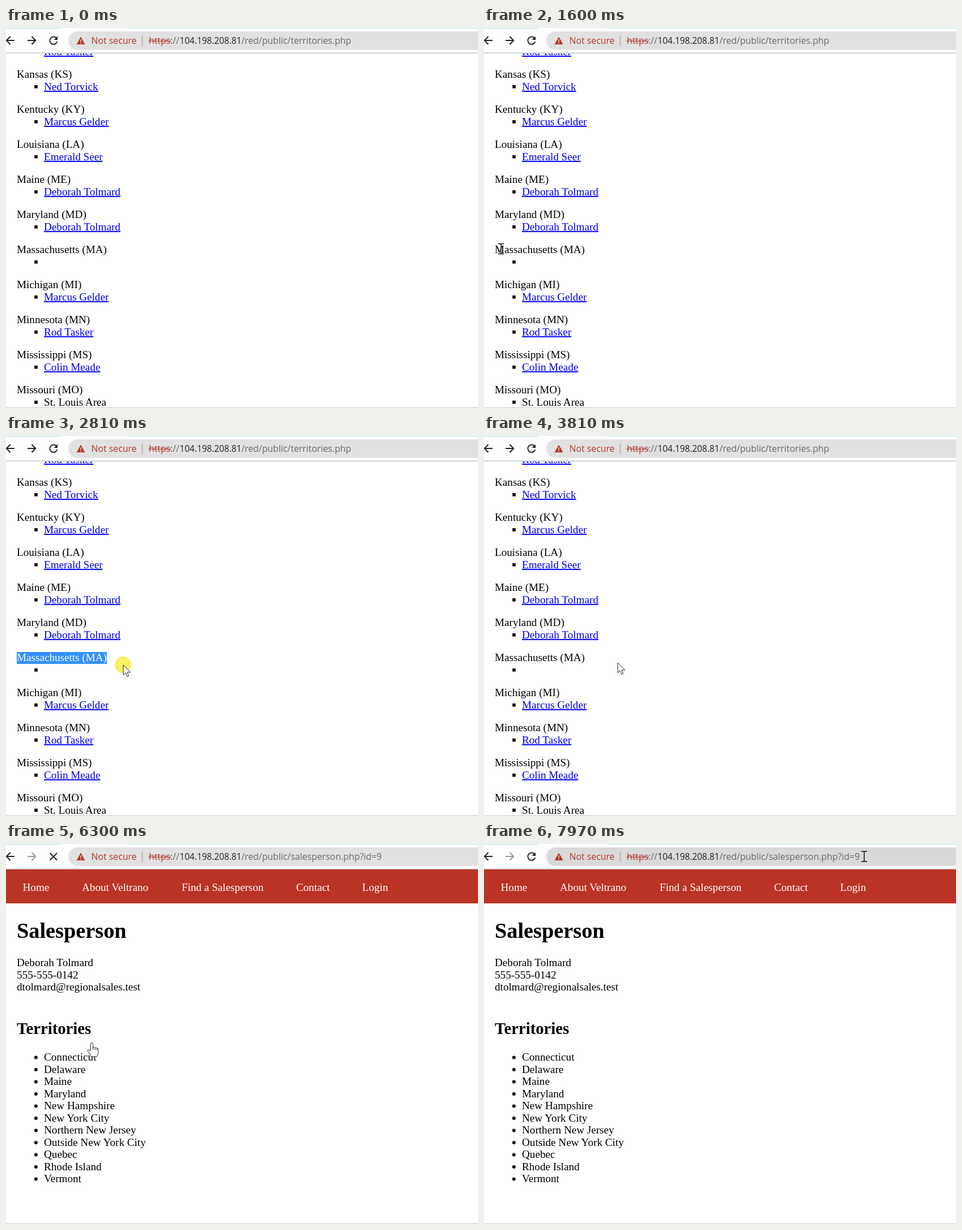
Write an HTML page that moves like this. It is 833x672 px and loops after 8 s.

```html
<!DOCTYPE html>
<html lang="en">
<head>
<meta charset="utf-8">
<title>Territories</title>
<style>
  html, body { margin: 0; width: 100%; height: 100%; overflow: hidden; background: #fff; }
  svg { display: block; width: 833px; height: 672px; }
  text { font: 19.15px "Liberation Serif", "Times New Roman", serif; }
  .link { fill: #00e; text-decoration: underline; }
  .nav { fill: #fff; }
  .h1 { font-size: 38.3px; font-weight: bold; }
  .h2 { font-size: 28.7px; font-weight: bold; }
  .bar text { font: 15.85px "Open Sans", "Noto Sans", sans-serif; fill: #66686b; }
  .bar .warn { fill: #b3362b; }
  .bar .host { font-size: 15.4px; fill: #202124; }
  .icon { fill: none; stroke: #202124; stroke-width: 2; }
  .pointer { fill: #fff; stroke: #222; stroke-width: 1; stroke-linejoin: round; }
</style>
</head>
<body>
<svg viewBox="0 0 833 672">
  <defs><clipPath id="clip"><rect id="clipBox" x="19" y="382" height="21.3"/></clipPath></defs>

  <g id="list"></g>
  <g id="selection">
    <rect x="19" y="382" width="160" height="21.3" fill="#3390fa" clip-path="url(#clip)"/>
    <text id="label" x="19" y="398" fill="#fff" clip-path="url(#clip)">Massachusetts (MA)</text>
  </g>
  <g id="person"></g>

  <g class="bar">
    <path d="M0 0H833V45H0Z" fill="#fff"/>
    <path d="M0 .5H95M217 .5H833" stroke="#b5e2f0"/>
    <path d="M0 44.3H833" stroke="#c6c8ca" stroke-width="1.4"/>
    <g class="icon">
      <path d="M15 22H1M7.5 15L.8 22L7.5 29"/>
      <path id="forward" d="M38 22H52M45.5 15L52.2 22L45.5 29"/>
      <path id="stop" d="M77.5 16L90 28.5M90 16L77.5 28.5"/>
      <g id="reload">
        <path d="M89.2 18.2A6.6 6.6 0 1 0 90.3 24"/>
        <path d="M91 14.5V21H84.5Z" fill="#202124" stroke="none"/>
      </g>
    </g>
    <rect id="pill" x="110" y="6" width="760" height="33" rx="16.5"/>
    <path d="M132 15.5L139.5 29H124.5Z" fill="#b3362b"/>
    <path d="M132 20V24.5M132 25.8V27.4" stroke="#e8e0e0" stroke-width="1.5"/>
    <text class="warn" x="150.5" y="28">Not secure</text>
    <path d="M240.5 13V32" stroke="#c0a09d" stroke-width="1.4"/>
    <text class="warn" x="252" y="28">https</text>
    <path d="M251.5 23.2H291" stroke="#b3362b" stroke-width="1.2"/>
    <text x="290" y="28">://</text>
    <text class="host" x="306.5" y="28">104.198.208.81</text>
    <text id="path" x="415.5" y="28"></text>
  </g>

  <path d="M0 671.5H833" stroke="#c8c8c8"/>
  <g id="cursor">
    <circle id="press" r="14.5" fill="#f5ea20" opacity=".72"/>
    <path id="arrow" class="pointer" d="M.5.5V18.3L4.6 14.4L7.4 21L10.2 19.8L7.4 13.4H13.2Z"/>
    <path id="hand" class="pointer" d="M-2.2 15V3a2.1 2.1 0 0 1 4.2 0v6q2-1 3.6 1 2.4-1 3.6.8 2.3-.4 2.3 2V17q0 4-2.5 8.5H-1.5q-1-4-4-7.5l-2.5-3.5q1.5-2.5 4 0zM2 9v4.5M5.6 10v4M9.2 10.8v3.5"/>
    <path id="ibeam" fill="none" stroke="#111" stroke-width="1.5" d="M-2.5-8H.8Q2.5-8 2.5-6.5Q2.5-8 4.2-8H7.5M2.5-7V9M-2.5 10H.8Q2.5 10 2.5 8.5Q2.5 10 4.2 10H7.5"/>
  </g>
</svg>
<script>
const $ = id => document.getElementById(id);
const text = (x, y, s, cls = "") => `<text x="${x}" y="${y}" class="${cls}">${s}</text>`;

const states = [
  ["Kansas (KS)", "Ned Torvick"], ["Kentucky (KY)", "Marcus Gelder"],
  ["Louisiana (LA)", "Emerald Seer"], ["Maine (ME)", "Deborah Tolmard"],
  ["Maryland (MD)", "Deborah Tolmard"], ["Massachusetts (MA)", ""],
  ["Michigan (MI)", "Marcus Gelder"], ["Minnesota (MN)", "Rod Tasker"],
  ["Mississippi (MS)", "Colin Meade"], ["Missouri (MO)", "St. Louis Area"]
];
$("list").innerHTML = text(67, 48, "Rod Tasker", "link") + states.map(([state, who], i) => {
  const y = 88 + 62 * i;
  return text(19, y, state) + `<rect x="50.2" y="${y + 13}" width="5.6" height="5.6"/>` +
    text(67, y + 22, who, i < 9 ? "link" : "");
}).join("");

const menu = [[29.5, "Home"], [134, "About Veltrano"], [310, "Find a Salesperson"], [512, "Contact"], [628.5, "Login"]];
const areas = ["Connecticut", "Delaware", "Maine", "Maryland", "New Hampshire", "New York City",
  "Northern New Jersey", "Outside New York City", "Quebec", "Rhode Island", "Vermont"];
$("person").innerHTML = `<path d="M0 45H833V105H0Z" fill="#ba3324"/>` +
  menu.map(([x, s]) => text(x, 83, s, "nav")).join("") +
  text(19, 166, "Salesperson", "h1") +
  ["Deborah Tolmard", "555-555-0142", "dtolmard@regionalsales.test"]
    .map((s, i) => text(19, 216.2 + 21.5 * i, s)).join("") +
  text(19, 336, "Territories", "h2") +
  areas.map((s, i) => `<circle cx="52.8" cy="${377.5 + 21.5 * i}" r="3"/>` +
    text(67, 383.2 + 21.5 * i, s)).join("");

// Pointer moves: start, end, steps, x, y, ease-out power
const moves = [
  [170, 370, 4, 153, 470, 1],
  [640, 840, 4, 70.5, 399, 1],
  [910, 1400, 8, 27, 383.5, 2],
  [1460, 1600, 3, 27.5, 389.5, 1],
  [2200, 2400, 4, 82.5, 393, 1],
  [2470, 2810, 5, 206.5, 404.5, 1.3],
  [3270, 3340, 2, 235.5, 400.5, 1],
  [4010, 4620, 10, 151.5, 350.5, 1.4],
  [7090, 7700, 10, 667, 37, 1.4],
  [7760, 7830, 2, 668, 24, 1],
  [7900, 7970, 2, 668.5, 21, 1]
];
const shapes = [[0, "arrow"], [370, "hand"], [710, "arrow"], [780, "ibeam"], [2670, "arrow"],
  [4500, "hand"], [7090, "arrow"], [7760, "ibeam"]];
const presses = [[2200, 3010], [3610, 3810], [4880, 5100]];

function pointer(t) {
  let x = 758, y = 717;
  for (const [from, to, n, endX, endY, power] of moves) {
    if (t < from) break;
    const step = Math.min(n, Math.floor((t - from) / (to - from) * (n - 1) + .02) + 1);
    const p = 1 - (1 - step / n) ** power;
    x += (endX - x) * p;
    y += (endY - y) * p;
  }
  return [x, y];
}

// Width of the label up to the letter edge nearest to x
function selectedWidth(x) {
  let best = 0;
  for (let i = 1; i <= 18; i++) {
    const w = $("label").getSubStringLength(0, i);
    if (Math.abs(19 + w - x) < Math.abs(19 + best - x)) best = w;
  }
  return best;
}

const show = (id, on) => $(id).style.display = on ? "" : "none";
const within = (t, [a, b]) => t >= a && t < b;

function draw(now) {
  const t = now % 8000, loaded = t >= 6300, loading = within(t, [5100, 6360]);
  show("list", !loaded);
  show("person", loaded);
  show("stop", loading);
  show("reload", !loading);
  $("forward").style.stroke = loaded ? "#9a9ba8" : "";
  $("path").textContent = "/red/public/" + (loaded ? "salesperson.php?id=9" : "territories.php");
  $("pill").setAttribute("fill", t < 7760 ? "#e1e1e2" : t < 7830 ? "#dddddd" : "#d9d9da");

  const selecting = within(t, [2200, 3810]);
  show("selection", selecting);
  if (selecting) $("clipBox").setAttribute("width", selectedWidth(pointer(t - 68)[0]));

  $("cursor").setAttribute("transform", `translate(${pointer(t)})`);
  const shape = shapes.filter(s => t >= s[0]).pop()[1];
  for (const id of ["arrow", "hand", "ibeam"]) show(id, id === shape);
  show("press", presses.some(p => within(t, p)));
}

let start;
function tick(now) {
  start ??= now;
  draw(now - start);
  requestAnimationFrame(tick);
}
draw(0);
requestAnimationFrame(tick);
</script>
</body>
</html>
```
